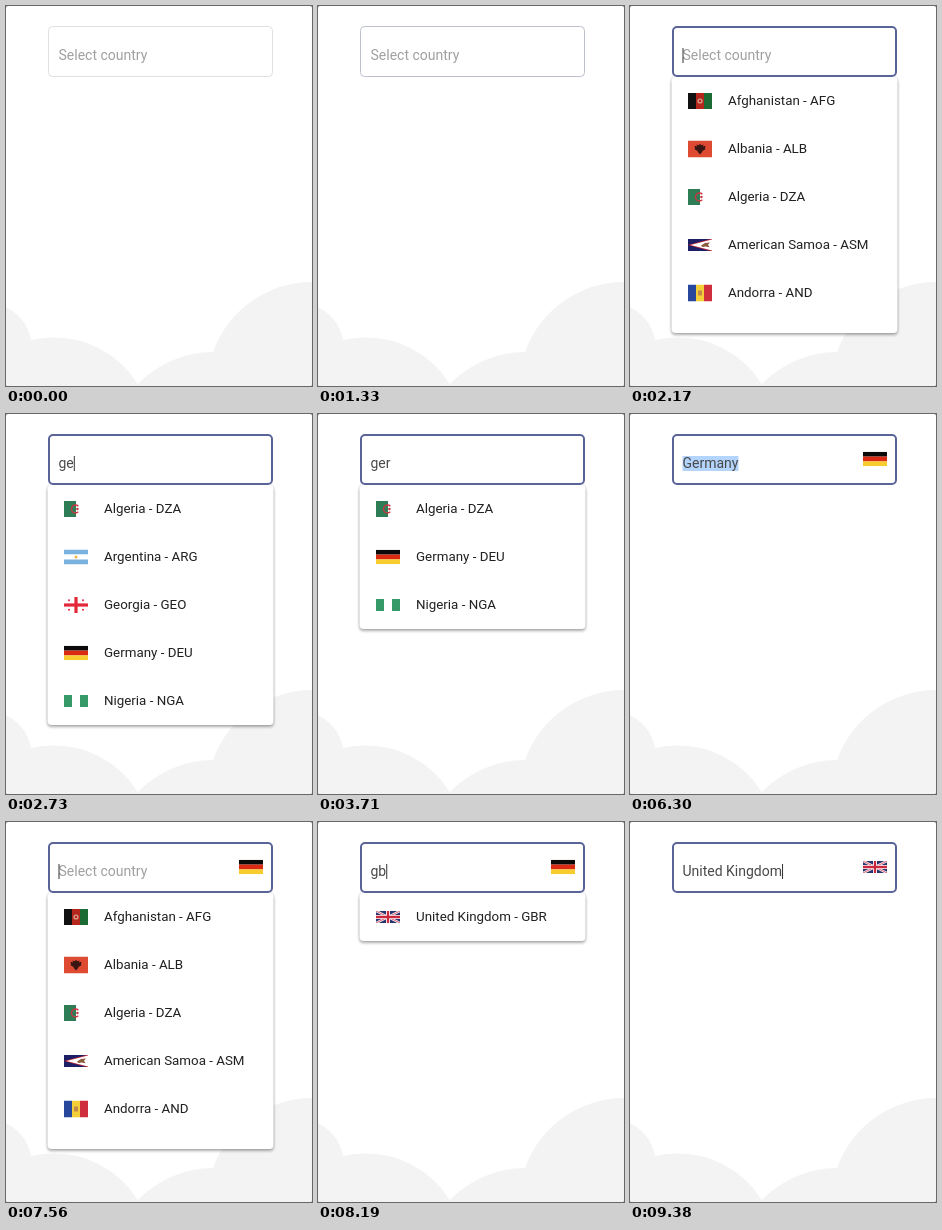
An HTML page for the animation above (9.66 s loop, 306 px wide and 380 px high).

```html
<!DOCTYPE html>
<html lang="en">
<head>
<meta charset="utf-8">
<title>Country select</title>
<style>
  html, body { margin: 0; width: 100%; height: 100%; overflow: hidden; background: #777; }
  svg { display: block; width: 100%; height: 100%; }
  text { font-family: Roboto, Arial, sans-serif; white-space: pre; }
  #value { font-size: 14px; }
  #rows text { font-size: 13.35px; fill: #212121; }
  #paper { filter: drop-shadow(0 2px 1.5px rgba(0,0,0,.27)) drop-shadow(0 0 1px rgba(0,0,0,.2)); }
</style>
</head>
<body>
<svg viewBox="0 0 306 380">
  <defs><clipPath id="stage"><rect width="306" height="380" rx="2"/></clipPath></defs>
  <g clip-path="url(#stage)">
    <rect width="306" height="380" fill="#fff"/>
    <g fill="#f3f3f3">
      <circle cx="-21" cy="343" r="47"/>
      <circle cx="48" cy="430" r="98.6"/>
      <circle cx="207" cy="450" r="104"/>
      <circle cx="306" cy="381" r="105"/>
    </g>
    <g id="list">
      <rect id="paper" x="41.5" y="71" width="226" rx="4" fill="#fff"/>
      <g id="rows"></g>
    </g>
    <rect id="border" fill="#fff"/>
    <rect id="mark" x="52.5" y="42" height="15" fill="#b3d4fd"/>
    <text id="value" x="52.5" y="54"></text>
    <rect id="caret" y="42" width="1" height="15" fill="#333"/>
    <g id="picked"></g>
  </g>
</svg>
<script>
const LOOP = 9660;
const $ = id => document.getElementById(id);

const box = (x, y, w, h, fill) => `<rect x="${x}" y="${y}" width="${w}" height="${h}" fill="${fill}"/>`;
const dot = (x, y, r, fill) => `<circle cx="${x}" cy="${y}" r="${r}" fill="${fill}"/>`;
const path = (d, fill) => `<path d="${d}" fill="${fill}"/>`;
const line = (d, color, w) => `<path d="${d}" fill="none" stroke="${color}" stroke-width="${w}"/>`;
const bars = (h, colors) => colors.map((c, i) => box(i * 24 / colors.length, 0, 24 / colors.length, h, c)).join('');
const bands = (h, colors) => colors.map((c, i) => box(0, i * h / colors.length, 24, h / colors.length, c)).join('');

// Each flag: height at 24 px width, then its shapes.
const flags = {
  AFG: [16, bars(16, ['#111', '#b5261c', '#1c6b35']) + dot(12, 8, 2.6, '#d9a08c') + dot(12, 8, 1.3, '#b5261c')],
  ALB: [17, box(0, 0, 24, 17, '#df4a32') +
    path('M12 3.5l1.5 1.2 2-.8-.6 2 2.6-.6-.6 4-2.2 1-.7 1.4L12 14l-2-2.3-.7-1.4-2.2-1-.6-4 2.6.6-.6-2 2 .8z', '#3a1512')],
  DZA: [16, box(0, 0, 12, 16, '#2f7d57') + box(12, 0, 12, 16, '#fff') +
    line('M14.3 5.2A4 4 0 1 0 14.3 10.8', '#cf3340', 1.3) + dot(13.4, 8, 1.2, '#cf3340')],
  ASM: [12, box(0, 0, 24, 12, '#1d1f66') + path('M0 6L24 -.4V12.4z', '#c0283a') + path('M2.5 6L24 .6V11.4z', '#fff') +
    path('M13 6.4l4-2.4 5-.5-2 2.3 1.5 2.4-4-.6-3 .4z', '#8a5a3c')],
  AND: [17, bars(17, ['#26479b', '#f3cf3a', '#cf2f3c']) + box(10, 6, 4, 5, '#c58a4a')],
  AGO: [16, bands(16, ['#c8202f', '#111']) + line('M11 4.5A3.6 3.6 0 1 1 10 10.5', '#f2c52e', 1.1)],
  ARG: [15, bands(15, ['#79b2de', '#fff', '#79b2de']) + dot(12, 7.5, 1.5, '#efb53a')],
  BGD: [14.4, box(0, 0, 24, 14.4, '#1a6b50') + dot(10.8, 7.2, 4.6, '#e23a45')],
  GEO: [16, box(0, 0, 24, 16, '#fff') + box(10.4, 0, 3.2, 16, '#e3283a') + box(0, 6.4, 24, 3.2, '#e3283a') +
    [5, 19].map(x => dot(x, 3.2, 1, '#e3283a') + dot(x, 12.8, 1, '#e3283a')).join('')],
  DEU: [14.4, bands(14.4, ['#0c0a08', '#da2a12', '#f8cc2c'])],
  NGA: [12, bars(12, ['#359a68', '#fff', '#359a68'])],
  GBR: [12, box(0, 0, 24, 12, '#28336f') + line('M0 0L24 12M24 0L0 12', '#fff', 2.4) +
    line('M0 0L24 12M24 0L0 12', '#cb3043', .8) + line('M12 0V12M0 6H24', '#fff', 4) +
    line('M12 0V12M0 6H24', '#cb2a3e', 2.3)]
};

const names = {
  AFG: 'Afghanistan', ALB: 'Albania', DZA: 'Algeria', ASM: 'American Samoa', AND: 'Andorra',
  AGO: 'Angola', ARG: 'Argentina', BGD: 'Bangladesh', GEO: 'Georgia', DEU: 'Germany',
  NGA: 'Nigeria', GBR: 'United Kingdom'
};

const ALL = 'AFG ALB DZA ASM AND';
const WITH_G = 'AFG DZA AGO ARG BGD';

// Scenes: start time, typed text, listed codes, and the rest of the field's state.
const scenes = [
  { at: 0 },
  { at: 2170, focus: true, list: ALL, more: true },
  { at: 2310, focus: true, text: 'g', list: WITH_G, more: true },
  { at: 2450, focus: true, text: 'ge', list: 'DZA ARG GEO DEU NGA' },
  { at: 3220, focus: true, text: 'ger', list: 'DZA DEU NGA' },
  { at: 4270, focus: true, text: 'germ', list: 'DEU' },
  { at: 5110, text: 'Germany', flag: 'DEU', caret: true },
  { at: 5180, focus: true, text: 'Germany', flag: 'DEU' },
  { at: 6300, focus: true, text: 'Germany', flag: 'DEU', marked: true },
  { at: 7560, focus: true, flag: 'DEU', list: ALL, more: true },
  { at: 7700, focus: true, text: 'g', flag: 'DEU', list: WITH_G, more: true },
  { at: 8190, focus: true, text: 'gb', flag: 'DEU', list: 'GBR', blink: 555 },
  { at: 9310, text: 'United Kingdom', flag: 'GBR', caret: true },
  { at: 9380, focus: true, text: 'United Kingdom', flag: 'GBR' }
];

const set = (el, attrs) => { for (const k in attrs) el.setAttribute(k, attrs[k]); };
const show = (el, on) => set(el, { visibility: on ? 'visible' : 'hidden' });

function flagAt(code, x, cy) {
  const [h, art] = flags[code];
  return `<svg x="${x}" y="${cy - h / 2}" width="24" height="${h}" viewBox="0 0 24 ${h}">${art}</svg>`;
}

function row(code, i) {
  const y = 95 + i * 48;
  return flagAt(code, 58, y) + `<text x="98" y="${y + 4}">${names[code]} - ${code}</text>`;
}

function drawScene(s) {
  const codes = s.list ? s.list.split(' ') : [];
  $('list').style.display = s.list ? '' : 'none';
  set($('paper'), { height: s.more ? 256 : codes.length * 48 });
  $('rows').innerHTML = codes.map(row).join('');
  $('picked').innerHTML = s.flag ? flagAt(s.flag, 233, 45) : '';
  $('value').textContent = s.text || 'Select country';
  set($('value'), { fill: s.text ? '#484848' : '#a0a0a0' });
  const width = s.text ? $('value').getComputedTextLength() : 0;
  set($('caret'), { x: 52.5 + width });
  set($('mark'), { width });
  show($('mark'), s.marked);
  const w = s.focus ? 2 : 1;
  set($('border'), { x: 42 + w / 2, y: 20 + w / 2, width: 225 - w, height: 51 - w, rx: 4, 'stroke-width': w });
}

function borderColor(s, t) {
  const from = [224, 224, 224], to = [91, 100, 150];
  const p = s.focus ? 1 : s.at ? 0 : Math.min(1, Math.max(0, (t - 1120) / 630));
  const k = p * p * (3 - 2 * p);
  return `rgb(${from.map((v, i) => Math.round(v + (to[i] - v) * k))})`;
}

let current;
function render(t) {
  const s = scenes.findLast(x => x.at <= t);
  if (s !== current) drawScene(current = s);
  set($('border'), { stroke: borderColor(s, t) });
  const lit = Math.floor((t - s.at) / (s.blink || 490)) % 2 === 0;
  show($('caret'), s.caret || (s.focus && !s.marked && lit));
}

const start = performance.now();
function tick() {
  render((performance.now() - start) % LOOP);
  requestAnimationFrame(tick);
}
tick();
</script>
</body>
</html>
```
